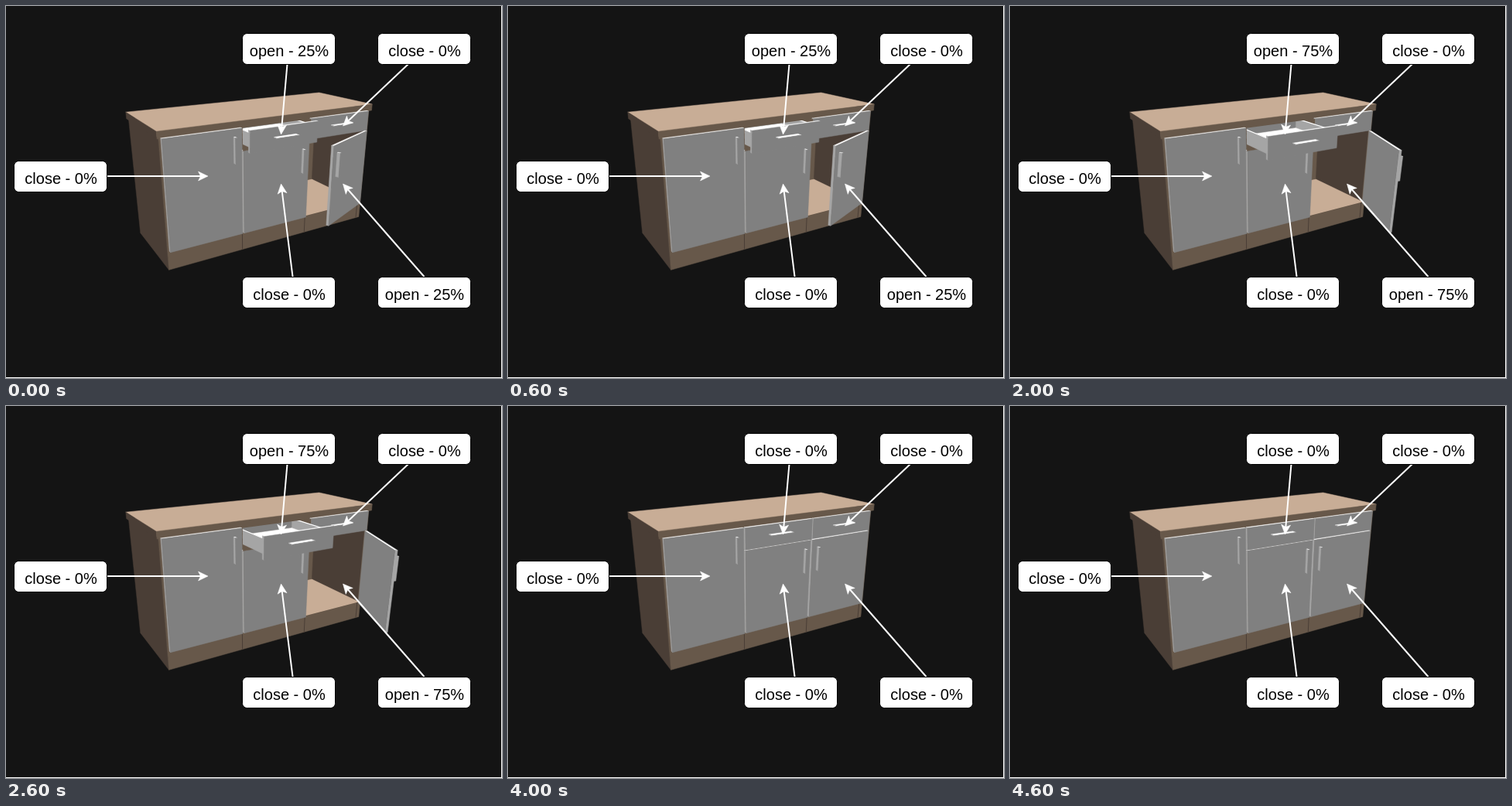
Write an HTML page with a canvas that moves like this. It is 641 px wide and 481 px high and loops after 5000 ms.

```html
<!DOCTYPE html>
<html lang="en">
<head>
<meta charset="utf-8">
<title>Cabinet states</title>
<style>
html, body { margin: 0; width: 100%; height: 100%; overflow: hidden; background: #141414; }
canvas { display: block; }
</style>
</head>
<body>
<canvas id="stage" width="641" height="481"></canvas>
<script>
const ctx = document.getElementById('stage').getContext('2d');
const { sin, cos, PI } = Math;
const WHITE = '#fff';
const paint = { front: '#808080', side: '#a5a5a5', top: WHITE };
const wood = { front: '#67584a', side: '#4a3e36', top: '#c8ad96' };

// Cabinet space: u along the front, v down, d into the depth; one unit is one door width.
const FOCAL = 575, PITCH = 0.375, YAW = 1.042;
const DRAWER = 0.27, DOOR = 1.38, BASE = 1.63, DEPTH = 1.18, THICK = 0.035;

function project([u, v, d]) {
  const right = -0.992 + u * sin(YAW) - d * cos(YAW);
  const ahead = 4.629 + u * cos(YAW) + d * sin(YAW);
  const down = 1.218 + v;
  const z = ahead * cos(PITCH) + down * sin(PITCH);
  const y = down * cos(PITCH) - ahead * sin(PITCH);
  return [320 + FOCAL * right / z, 240 + FOCAL * y / z];
}

function trace(points) {
  ctx.beginPath();
  for (const p of points) ctx.lineTo(...p);
}

function fill(color, points) {
  trace(points);
  ctx.closePath();
  ctx.fillStyle = ctx.strokeStyle = color;
  ctx.lineWidth = 0.5;
  ctx.fill();
  ctx.stroke();
}

function line(color, width, points) {
  trace(points);
  ctx.strokeStyle = color;
  ctx.lineWidth = width;
  ctx.stroke();
}

function area(pts) {
  return pts.reduce((sum, [x, y], i) => {
    const [nx, ny] = pts[(i + 1) % pts.length];
    return sum + x * ny - nx * y;
  }, 0);
}

const rect = (u0, u1, v0, v1, d) => [[u0, v0, d], [u1, v0, d], [u1, v1, d], [u0, v1, d]].map(project);
const wall = (u, v0, v1, d0, d1) => [[u, v0, d1], [u, v0, d0], [u, v1, d0], [u, v1, d1]].map(project);
const shelf = (u0, u1, v, d0, d1) => [[u0, v, d1], [u1, v, d1], [u1, v, d0], [u0, v, d0]].map(project);

// Draws the faces of a block that look towards the viewer.
function block(colors, [u0, u1], [v0, v1], [d0, d1], move = p => p) {
  const face = (color, corners) => {
    const pts = corners.map(p => project(move(p)));
    if (area(pts) > 0) fill(color, pts);
  };
  const upright = (color, a, b, c, d) =>
    face(color, [[a, v0, b], [c, v0, d], [c, v1, d], [a, v1, b]]);
  face(colors.top, [[u0, v0, d1], [u1, v0, d1], [u1, v0, d0], [u0, v0, d0]]);
  upright(colors.side, u0, d1, u0, d0);
  upright(colors.side, u1, d0, u1, d1);
  upright(colors.front, u1, d1, u0, d1);
  upright(colors.front, u0, d0, u1, d0);
}

function clipTo(points, paintInside) {
  ctx.save();
  trace(points);
  ctx.clip();
  paintInside();
  ctx.restore();
}

function panel(u, v0, v1, move) {
  block(paint, [u + 0.01, u + 0.99], [v0, v1], [0, THICK], move);
}

function grip(u, v, move) {
  block(paint, [u, u + 0.02], [v, v + 0.32], [-0.06, -0.015], move);
}

function body() {
  block(wood, [-0.015, 3.03], [0, BASE], [THICK, DEPTH]);
  block(wood, [-0.042, 3.048], [-0.0885, -0.005], [0, DEPTH]);
  for (const u of [1, 2, 2.97])
    line(wood.side, 1, [[u, DOOR, THICK], [u, BASE, THICK]].map(project));
}

function compartment() {
  const back = DEPTH - 0.03, floor = DOOR - 0.02;
  clipTo(rect(2, 2.98, DRAWER, DOOR, THICK), () => {
    fill(wood.front, rect(1, 3, 0, DOOR, back));
    fill(wood.side, wall(2.97, 0, DOOR, 0, back));
    fill(wood.top, shelf(1, 2.97, floor, 0, back));
  });
}

function swingDoor(angle) {
  const c = cos(angle), s = sin(angle);
  const move = ([u, v, d]) => [3 - (3 - u) * c - d * s, v, d * c - (3 - u) * s];
  const parts = [() => panel(2, DRAWER + 0.01, DOOR, move), () => grip(2.08, 0.38, move)];
  if (angle >= PI / 4) parts.reverse();
  parts.forEach(part => part());
}

function tray(out) {
  const u0 = 1.06, u1 = 1.94, rim = 0.05, floor = 0.18;
  const near = THICK - out, far = 0.8 - out;
  fill(wood.front, rect(1, 2, 0, DRAWER + 0.01, 0));
  fill(paint.front, rect(u0, u1, rim, floor, far));
  fill(paint.side, wall(u1, rim, floor, near, far));
  fill(paint.top, shelf(u0, u1, floor, near, far));
  fill(paint.side, wall(u0, rim, 0.23, near, far));
  line(WHITE, 1.2, shelf(u0, u1, rim, near, far).slice(0, 3));
  line(WHITE, 1.2, [[u0, rim, far], [u0, rim, near]].map(project));
}

function drawer(u, out) {
  const move = ([a, v, d]) => [a, v, d - out];
  if (out) clipTo(rect(1, 3, 0, DOOR, 0), () => tray(out));
  panel(u, 0, DRAWER, move);
  block(paint, [u + 0.34, u + 0.66], [0.12, 0.125], [-0.07, 0], move);
}

function cabinet(k) {
  body();
  if (k) compartment();
  panel(0, 0, DOOR);
  grip(0.87, 0.09);
  panel(1, DRAWER + 0.01, DOOR);
  grip(1.87, 0.38);
  drawer(2, 0);
  swingDoor(k * PI / 8);
  drawer(1, k * 0.155);
}

function arrow(x1, y1, x2, y2) {
  ctx.save();
  ctx.translate(x2, y2);
  ctx.rotate(Math.atan2(y2 - y1, x2 - x1));
  line(WHITE, 2, [[-Math.hypot(x2 - x1, y2 - y1), 0], [-9, 0]]);
  fill(WHITE, [[0, 0], [-12.5, 6], [-9.5, 0], [-12.5, -6]]);
  ctx.restore();
}

function label(x, y, open) {
  ctx.beginPath();
  ctx.roundRect(x + 0.5, y + 0.5, 120, 40, 6);
  ctx.fillStyle = WHITE;
  ctx.fill();
  ctx.strokeStyle = '#000';
  ctx.lineWidth = 1;
  ctx.stroke();
  ctx.fillStyle = '#000';
  ctx.fillText(open ? `open - ${open * 25}%` : 'close - 0%', x + 61, y + 30);
}

function draw(k) {
  ctx.fillStyle = WHITE;
  ctx.fillRect(0, 0, 641, 481);
  ctx.fillStyle = '#141414';
  ctx.fillRect(0, 0, 640, 480);
  cabinet(k);

  arrow(363.5, 75, 355.5, 166);
  arrow(520, 75, 435.5, 155);
  arrow(130, 220, 261, 220);
  arrow(370.5, 350, 355.5, 230);
  arrow(540.5, 350, 435.5, 230);

  ctx.font = '20px "Liberation Sans", Arial, sans-serif';
  ctx.textAlign = 'center';
  label(305, 35, k);
  label(480, 35, 0);
  label(10, 200, 0);
  label(305, 350, 0);
  label(480, 350, k);
}

const start = performance.now();
function tick() {
  const step = Math.floor((performance.now() - start) / 1000);
  draw((step + 1) % 5);
  requestAnimationFrame(tick);
}
tick();
</script>
</body>
</html>
```
